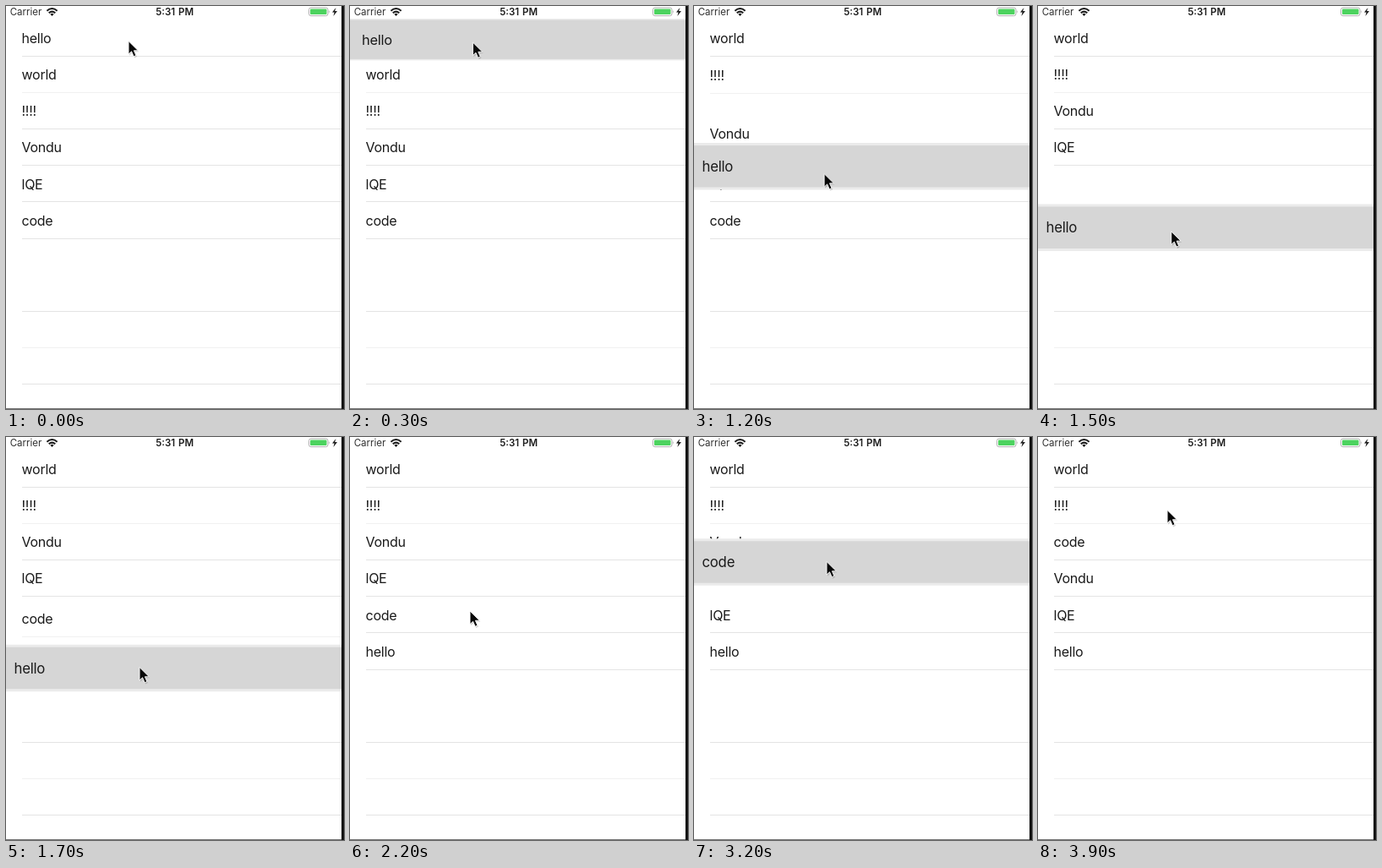
An HTML page that plays this animation: 400x477 px, repeating every 4 s.

```html
<!DOCTYPE html>
<html lang="en">
<head>
<meta charset="utf-8">
<title>Reorderable list</title>
<style>
  html, body { margin: 0; width: 100%; height: 100%; overflow: hidden; background: #fff; }
  svg { display: block; width: 400px; height: 477px; font-family: Inter, Roboto, sans-serif; }
  .label { font-size: 16px; letter-spacing: -0.25px; fill: #1a1a1a; }
  .status { font-size: 11.5px; fill: #303030; }
  .clock { font-weight: 600; word-spacing: 1px; text-anchor: middle; fill: #1c1c1c; }
  .line { fill: #e4e4e4; }
  .faint { fill: #f1f1f1; }
  .band { fill: #d6d6d6; stroke: #ebebeb; }
</style>
</head>
<body>
<svg viewBox="0 0 400 477">
  <rect width="400" height="477" fill="#fff"/>
  <rect class="line" x="19" y="361" width="378" height="1"/>
  <rect class="faint" x="19" y="404" width="378" height="1"/>
  <rect class="line" x="19" y="447" width="378" height="1"/>
  <g id="list"></g>

  <text class="status" x="4.7" y="11">Carrier</text>
  <g fill="none" stroke="#1c1c1c" stroke-width="2">
    <path d="M48.4 5.7Q54.5 0.3 60.6 5.7"/>
    <path d="M50.7 8.2Q54.5 5 58.3 8.2"/>
  </g>
  <path d="M52.4 9.6Q54.5 8 56.6 9.6L54.5 11.9Z" fill="#1c1c1c"/>
  <text class="status clock" x="199.6" y="11">5:31 PM</text>
  <rect x="358.5" y="2" width="22.5" height="9.6" rx="2.4" fill="#fff" stroke="#b0b0b0"/>
  <rect x="360" y="3.5" width="19.5" height="6.6" rx="1" fill="#4cd35f"/>
  <path d="M382.2 5Q384 6.8 382.2 8.6Z" fill="#b0b0b0"/>
  <path d="M390.4 2L386 7.6H388.6L387.4 12L392 6.1H389.2Z" fill="#1c1c1c"/>

  <rect y="476" width="397" height="1" fill="#777"/>
  <rect x="397" width="3" height="477" fill="#141414"/>

  <g id="cursor">
    <path d="M1 2V18.5L4.8 15L7.7 21.5L10.8 20L8 13.8H13.3Z" fill="#000" opacity="0.16"/>
    <path d="M0 0V16.8L3.8 13.2L6.6 19.6L9.6 18.3L6.9 12.1H12.2Z"
          fill="#080808" stroke="#fff" stroke-linejoin="round"/>
  </g>
</svg>
<script>
const LOOP = 4000, STEP = 100, TOP = 38, PITCH = 43.2, SHIFT = 300, MID = 198.5;
const list = document.getElementById("list");
const cursor = document.getElementById("cursor");

const slotY = slot => TOP + PITCH * slot;
const ramp = (t, start, end) => Math.min(1, Math.max(0, (t - start) / (end - start)));
const smooth = p => p * p * (3 - 2 * p);
// A hand's push: starts briskly, slows down gently.
const push = p => (smooth(p) + Math.sin(p * Math.PI / 2)) / 2;

// Runs a value through strokes of [start, end, target].
const follow = (value, strokes, t, ease) => strokes.reduce(
  (v, [start, end, target]) => v + (target - v) * ease(ramp(t, start, end)), value);

const shift = (start, slot) => [start, start + SHIFT, slotY(slot)];

const rows = [
  { text: "world", slot: 1, moves: [shift(770, 0)] },
  { text: "!!!!", slot: 2, moves: [shift(925, 1)] },
  { text: "Vondu", slot: 3, moves: [shift(1075, 2), shift(3300, 3)] },
  { text: "lQE", slot: 4, moves: [shift(1200, 3), shift(2790, 4)] },
  { text: "code", slot: 5, moves: [shift(1460, 4)],
    drag: { press: 2400, lift: 2500, drop: 3700, end: 3900,
      strokes: [[2500, 2700, 207], [2700, 3200, 148], [3300, 3600, 116], [3700, 3900, slotY(2)]] } },
  { text: "hello", slot: 0, moves: [],
    drag: { press: 100, lift: 250, drop: 1850, end: 2100,
      strokes: [[250, 400, 42.5], [700, 1650, 273.5], [1850, 2100, slotY(5)]] } }
];

// Strokes of the pointer as [start, end, x, y].
const hand = [
  [250, 400, 146, 45], [700, 1600, 158, 272], [1850, 2200, 142, 205.5],
  [2700, 3200, 157, 147], [3300, 3600, 155, 114], [3700, 3900, 153, 86]
];
const handX = hand.map(([start, end, x]) => [start, end, x]);
const handY = hand.map(([start, end, , y]) => [start, end, y]);

function add(tag, attrs) {
  const el = document.createElementNS("http://www.w3.org/2000/svg", tag);
  set(el, attrs);
  return list.appendChild(el);
}

function set(el, attrs) {
  for (const name in attrs) el.setAttribute(name, attrs[name]);
}

for (const row of rows) row.line = add("rect", { x: 19, width: 378, height: 1 });
for (const row of rows) {
  if (row.drag) row.band = add("rect", { class: "band", x: -4, width: 405 });
  row.label = add("text", { class: "label", x: 18.5, y: 5.7 });
  row.label.textContent = row.text;
}

function drawRow({ slot, moves, drag, line, band, label }, t) {
  let y = follow(slotY(slot), moves, t, smooth), lift = 0;
  if (drag) {
    y = follow(y, drag.strokes, t, push);
    const held = 1 - ramp(t, drag.drop, drag.end);
    lift = ramp(t, drag.lift, drag.lift + 100) * held;
    const height = PITCH + 9.3 * lift;
    set(band, {
      y: y - height / 2, height,
      "stroke-width": 3 * lift,
      opacity: t < drag.press ? 0 : Math.sqrt(held)
    });
  }
  const scale = 1 + 0.05 * lift;
  set(label, { transform: `translate(${MID * (1 - scale)} ${y}) scale(${scale})` });

  const place = (y - TOP) / PITCH, near = Math.round(place);
  const crisp = near !== 1 && Math.abs(place - near) < 0.05;
  set(line, {
    y: Math.floor(y + 21.1),
    class: crisp ? "line" : "faint",
    opacity: lift > 0 ? 0 : 1
  });
}

function draw(now) {
  const t = Math.floor(now % LOOP / STEP) * STEP;
  for (const row of rows) drawRow(row, t);
  const x = follow(145, handX, t, push), y = follow(41, handY, t, push);
  set(cursor, { transform: `translate(${x} ${y + 0.5}) scale(0.93)` });
}

const begin = performance.now();
function tick() {
  draw(performance.now() - begin);
  requestAnimationFrame(tick);
}
tick();
</script>
</body>
</html>
```
